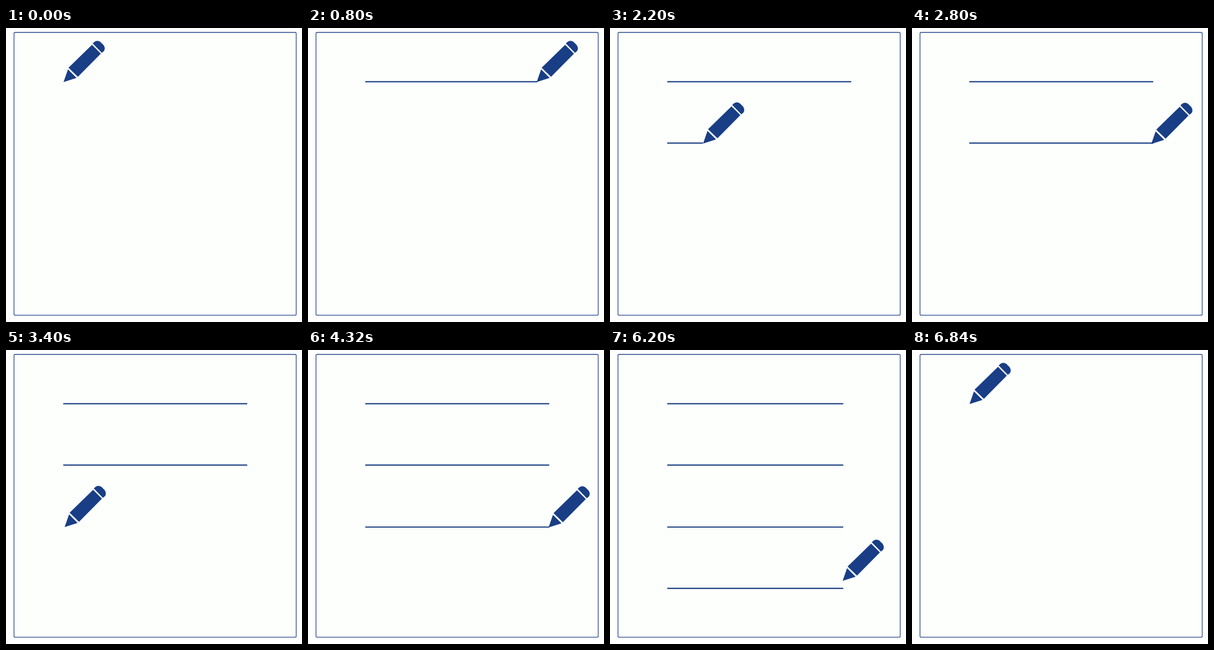
Animation, 536 px wide and 533 px high, one loop 6.88 s. Source, as an HTML page:

```html
<!DOCTYPE html>
<html lang="en">
<head>
<meta charset="utf-8">
<title>Pencil drawing lines</title>
<style>
  html, body { margin: 0; width: 100%; height: 100%; overflow: hidden; background: #fefffe; }
  svg { display: block; }
</style>
</head>
<body>
<svg width="536" height="533" viewBox="0 0 536 533">
  <rect x="14.5" y="8" width="511" height="512.7" rx="2" fill="#fcfffc" stroke="#26478a" stroke-width="1.3"/>
  <path id="lines" fill="none" stroke="#1d4085" stroke-width="2.2"/>
  <!-- the tip of the pencil is the origin -->
  <path id="pen" fill="#193e86" d="M0 0L8 -23L23.5 -7.5ZM9 -26L51.5 -67.5L67.5 -51.5L26 -9.5Z
    M52.8 -70L56 -73Q61 -76.5 66.5 -73L72.5 -67Q76.5 -61 73 -56L69.3 -53Z"/>
</svg>
<script>
const LOOP = 6880, STEP = 40;
const LEFT = 103.6, RIGHT = 436.8;
const rows = [97.4, 208.7, 321, 432.2];
// Start of each stroke and return, alternating, then the final rest.
const keys = [180, 1010, 1910, 2705, 3490, 4345, 5212, 6020, 6834];
const lines = document.getElementById('lines');
const pen = document.getElementById('pen');

const ease = u => u < 0.5 ? 4 * u ** 3 : 1 - 4 * (1 - u) ** 3;
const mix = (a, b, p) => a + (b - a) * p;
const progress = (t, i) =>
  ease(Math.min(1, Math.max(0, (t - keys[i]) / (keys[i + 1] - keys[i]))));

function draw(now) {
  const t = Math.floor(now % LOOP / STEP) * STEP;
  const erase = progress(t, 7);
  let x = 0, y = rows[0], d = '';
  rows.forEach((row, i) => {
    const stroke = progress(t, 2 * i), back = progress(t, 2 * i + 1);
    const length = stroke * (1 - erase);
    if (length > 0.001) d += `M${LEFT} ${row}H${mix(LEFT, RIGHT, length)}`;
    x += stroke - back;
    y += (rows[(i + 1) % 4] - row) * back;
  });
  lines.setAttribute('d', d);
  pen.setAttribute('transform', `translate(${mix(104.2, 435.6, x)} ${y + 0.7})`);
}

let start;
function tick(now) {
  start ??= now;
  draw(now - start);
  requestAnimationFrame(tick);
}
draw(0);
requestAnimationFrame(tick);
</script>
</body>
</html>
```
